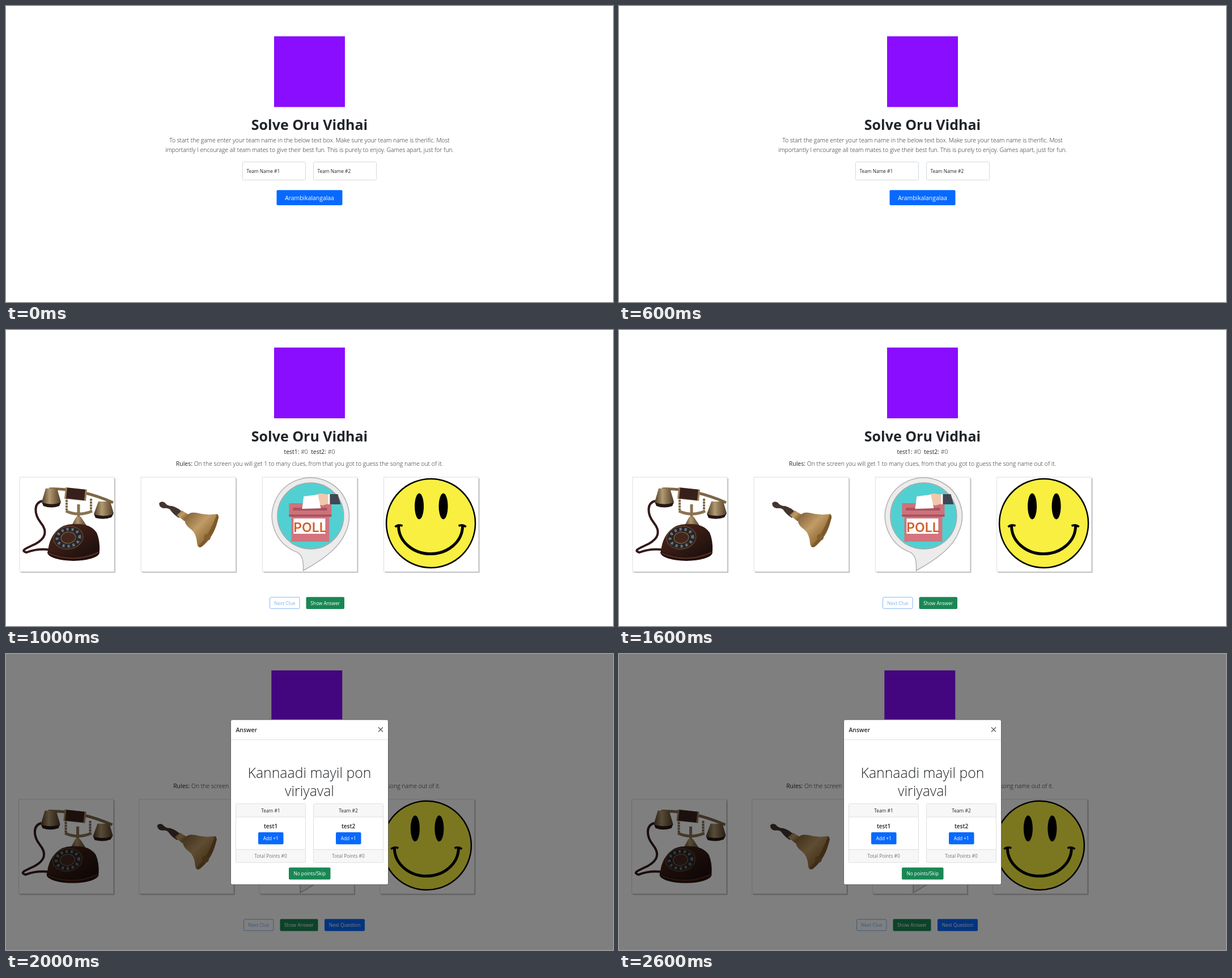
Write an HTML page that moves like this. It is 1071 by 523 pixels and loops after 3000 ms.

```html
<!DOCTYPE html>
<html lang="en">
<head>
<meta charset="utf-8">
<title>Guessing game</title>
<style>
  html, body { margin: 0; width: 100%; height: 100%; overflow: hidden; background: #fff; }
  svg { display: block; width: 100%; height: 100%; font-family: "Open Sans", "Noto Sans", sans-serif; }
</style>
</head>
<body>
<svg viewBox="0 0 1071 523">
  <defs>
    <linearGradient id="brass" x1="0" y1="0" x2="1" y2="1">
      <stop offset="0" stop-color="#7d5c36"/>
      <stop offset=".4" stop-color="#c09c66"/>
      <stop offset=".65" stop-color="#9c7642"/>
      <stop offset="1" stop-color="#6a4824"/>
    </linearGradient>
    <linearGradient id="bronze">
      <stop offset="0" stop-color="#4a3a27"/>
      <stop offset=".4" stop-color="#b39a70"/>
      <stop offset="1" stop-color="#4d3a26"/>
    </linearGradient>
    <linearGradient id="wood" x1="0" y1="0" x2="1" y2="1">
      <stop offset="0" stop-color="#54291c"/>
      <stop offset="1" stop-color="#170d0c"/>
    </linearGradient>

    <g id="phone" fill="none">
      <path d="M40 42C24 46 26 66 37 80C50 96 46 108 28 118C8 127 2 130 12 133Q30 126 52 128" stroke="#35191b" stroke-width="4"/>
      <path d="M52 21Q105 19 165 45" stroke="#7d6746" stroke-width="5"/>
      <path d="M83 35V62M126 38V62" stroke="#806a48" stroke-width="4" stroke-dasharray="4 1"/>
      <path d="M82 60Q104 70 128 60M104 48V84" stroke="#8a7350" stroke-width="5"/>
      <path d="M91 87L100 70H108L119 87Z" fill="url(#bronze)"/>
      <path d="M80 28L118 32" stroke="#98805a" stroke-width="20"/>
      <path d="M83 28L115 31.500" stroke="#37201b" stroke-width="19"/>
      <path d="M46 20H66L73 44Q56 51 39 44Z" fill="url(#bronze)"/>
      <path d="M39 44Q56 51 73 44L70 51Q56 56 42 51Z" fill="#251815"/>
      <path d="M139 43H160L166 64Q149 72 131 65Z" fill="url(#bronze)"/>
      <path d="M131 65Q149 72 166 64L162 71Q149 76 134 72Z" fill="#251815"/>
      <ellipse cx="95" cy="133" rx="46" ry="15" fill="#24110f"/>
      <path d="M50 131Q52 108 66 94Q78 82 96 83Q124 81 136 98Q142 112 141 131Q95 150 50 131Z" fill="url(#wood)"/>
      <path d="M51 134Q95 153 139 133" stroke="#5b2f20" stroke-width="2"/>
      <g transform="rotate(-8 86 107)">
        <ellipse cx="86" cy="107" rx="26" ry="20" fill="#2b2422" stroke="#6c573d"/>
        <ellipse cx="86" cy="107" rx="20" ry="15" stroke="#667180" stroke-width="5" stroke-dasharray="4 5"/>
        <ellipse cx="86" cy="107" rx="13" ry="10" fill="#43271e" stroke="#8a7050"/>
      </g>
    </g>

    <g id="bell">
      <path d="M32 46Q36 41 42 45Q46 51 55 51Q66 54 74 63L67 72Q58 67 51 57Q47 54 40 55Q32 54 32 46Z" fill="#44352f"/>
      <path d="M63 67L72 59L84 66L77 78Z" fill="url(#brass)"/>
      <path d="M78 72Q84 60 98 63Q116 68 134 65Q139 68 135 78Q128 106 107 123Q100 126 99 117Q98 100 88 92Q75 83 78 72Z" fill="url(#brass)"/>
      <path d="M134 65Q139 68 135 78Q128 106 107 123Q102 125 101 122Q120 104 134 65Z" fill="#7d592c"/>
      <circle cx="117" cy="106" r="6" fill="#85602f"/>
    </g>

    <g id="poll">
      <path d="M72 165Q74 136 58 131.400A68 68 0 1 1 146 99Q133 132 72 165Z" fill="#ececec" stroke="#b0b0b0" stroke-width="1.500"/>
      <circle cx="85" cy="68.500" r="58.500" fill="#52d0d1" stroke="#a9a9a9" stroke-width="1.500"/>
      <path d="M51 68H118V114H51Z" fill="#d3747e"/>
      <path d="M47 46H122V68H47Z" fill="#cf717b"/>
      <path d="M54 54H114V59H54ZM47 66H122V70H47Z" fill="#a9535e"/>
      <path d="M118 30H133L138 48H118Z" fill="#414652"/>
      <path d="M115 30H119V48H115Z" fill="#fff"/>
      <path d="M86 38Q94 28 106 29L116 31V47L106 50Q96 48 86 38Z" fill="#f2c8ad"/>
      <path d="M73 34L98 31L103 55L70 56Z" fill="#fff"/>
      <path d="M55 73H111V100H55Z" fill="#fff"/>
      <text x="84" y="96.500" font-family="Inter, sans-serif" font-size="23" font-weight="600" text-anchor="middle" fill="#d3602b">POLL</text>
    </g>

    <g id="smile" fill="none" stroke="#000">
      <circle cx="83" cy="81.500" r="78.500" fill="#f8ef40" stroke-width="2.500"/>
      <g fill="#000" stroke="none">
        <ellipse cx="62.500" cy="51.500" rx="8" ry="23"/>
        <ellipse cx="105" cy="51.500" rx="8" ry="23"/>
      </g>
      <path d="M26 86A56.500 49.500 0 0 0 139 86" stroke-width="5"/>
      <path d="M20 88Q25 83 33 86M132 86Q140 83 145 88" stroke-width="3.500"/>
    </g>
  </defs>
</svg>
<script>
const BLUE = '#0769fe', GREEN = '#198754', INK = '#212529', MID = 535.5;

const text = (x, y, str, size, { weight = 400, fill = INK, anchor = 'middle' } = {}) =>
  `<text x="${x}" y="${y}" font-size="${size}" font-weight="${weight}" fill="${fill}" text-anchor="${anchor}">${str}</text>`;

const box = (x, y, w, h, fill, stroke = 'none', r = 2) =>
  `<rect x="${x}" y="${y}" width="${w}" height="${h}" rx="${r}" fill="${fill}" stroke="${stroke}"/>`;

const button = (x, y, w, label, fill) =>
  box(x, y, w, 21.2, fill) + text(x + w / 2, y + 13.8, label, 8.3, { weight: 500, fill: '#fff' });

const ghostButton = (x, y, w, label) =>
  `<g opacity=".65">${box(x + .5, y + .5, w - 1, 20, 'none', '#3d8bfd')}` +
  `${text(x + w / 2, y + 13.8, label, 8.4, { fill: '#3d8bfd' })}</g>`;

const header = (cx, top) =>
  box(cx - 62.5, top, 125, 125, '#8a0dff', 'none', 0) +
  text(cx, top + 165.5, 'Solve Oru Vidhai', 25, { weight: 700 });

const light = str => `<tspan font-weight="300">${str}</tspan>`;

function intro() {
  const lines = [
    'To start the game enter your team name in the below text box. Make sure your team name is therific. Most',
    'importantly I encourage all team mates to give their best fun. This is purely to enjoy. Games apart, just for fun.'
  ];
  const field = (x, n) => box(x, 275.5, 111, 32, '#fff', '#d3d8de') +
    text(x + 7, 294.7, 'Team Name #' + n, 8.3, { anchor: 'start' });
  return header(MID, 53.5) +
    lines.map((s, i) => text(MID, 241.3 + i * 16.7, s, 10.4, { weight: 300 })).join('') +
    field(417.5, 1) + field(542.5, 2) +
    box(477.5, 325.3, 116, 26.7, BLUE) +
    text(MID, 343, 'Arambikalangalaa', 10.4, { weight: 500, fill: '#fff' });
}

const clueCards = (x, y, step) => ['phone', 'bell', 'poll', 'smile'].map((id, i) =>
  `<g transform="translate(${x + i * step} ${y})">` +
  box(2, 2, 167, 167, '#bdbdbd', 'none', 1) + box(0, 0, 167, 167, '#fff', '#dedede', 0) +
  `<use href="#${id}"/></g>`).join('');

const rules = (cx, y) => text(cx, y, 'Rules: ' +
  light('On the screen you will get 1 to many clues, from that you got to guess the song name out of it.'), 10.45);

function clues() {
  return header(MID, 31) +
    text(MID, 219, `test1: ${light('#0')}\u00a0 test2: ${light('#0')}`, 10.4) +
    rules(MID, 240.3) + clueCards(24, 260, 214.2) +
    ghostButton(465, 471.7, 53.5, 'Next Clue') +
    button(529.5, 471.7, 67.5, 'Show Answer', GREEN);
}

function teamCard(x, n) {
  const cx = x + 61.5, line = '#dfdfdf';
  return box(x, 264.5, 123, 104, '#f7f7f7', line) +
    box(x, 288, 123, 57.5, '#fff', line, 0) +
    text(cx, 279.6, 'Team #' + n, 8.35) +
    text(cx, 308, 'test' + n, 10, { weight: 600 }) +
    button(cx - 22, 315, 44.5, 'Add +1', BLUE) +
    text(cx, 359.8, 'Total Points #0', 8.35, { fill: '#6c757d' });
}

function answer() {
  const cx = 530.8;
  return header(cx, 29) + rules(cx, 236.8) + clueCards(22.5, 256.8, 212.3) +
    ghostButton(419, 468.3, 53.5, 'Next Clue') +
    button(483.5, 468.3, 67, 'Show Answer', GREEN) +
    button(562, 468.3, 71, 'Next Question', BLUE) +
    '<rect width="1071" height="523" opacity=".5"/>' +
    box(396.5, 116, 278, 291.5, '#fff', '#666', 3) +
    text(405.5, 137.6, 'Answer', 10.4, { weight: 600, anchor: 'start' }) +
    '<path d="M657 129.500l8 8m0-8l-8 8" stroke="#555" stroke-width="1.200"/>' +
    '<path d="M397 151.500H674" stroke="#dee2e6"/>' +
    text(MID, 218.5, 'Kannaadi mayil pon', 24.8, { weight: 300 }) +
    text(MID, 250.5, 'viriyaval', 24.8, { weight: 300 }) +
    teamCard(405.5, 1) + teamCard(542.5, 2) +
    button(499, 377.3, 73.5, 'No points/Skip', GREEN);
}

const svg = document.querySelector('svg');
const scenes = [intro, clues, answer].map(build => {
  const g = document.createElementNS('http://www.w3.org/2000/svg', 'g');
  g.innerHTML = build();
  return svg.appendChild(g);
});

function draw() {
  const current = Math.floor(performance.now() / 1000) % scenes.length;
  scenes.forEach((g, i) => g.style.display = i === current ? '' : 'none');
  requestAnimationFrame(draw);
}
draw();
</script>
</body>
</html>
```
